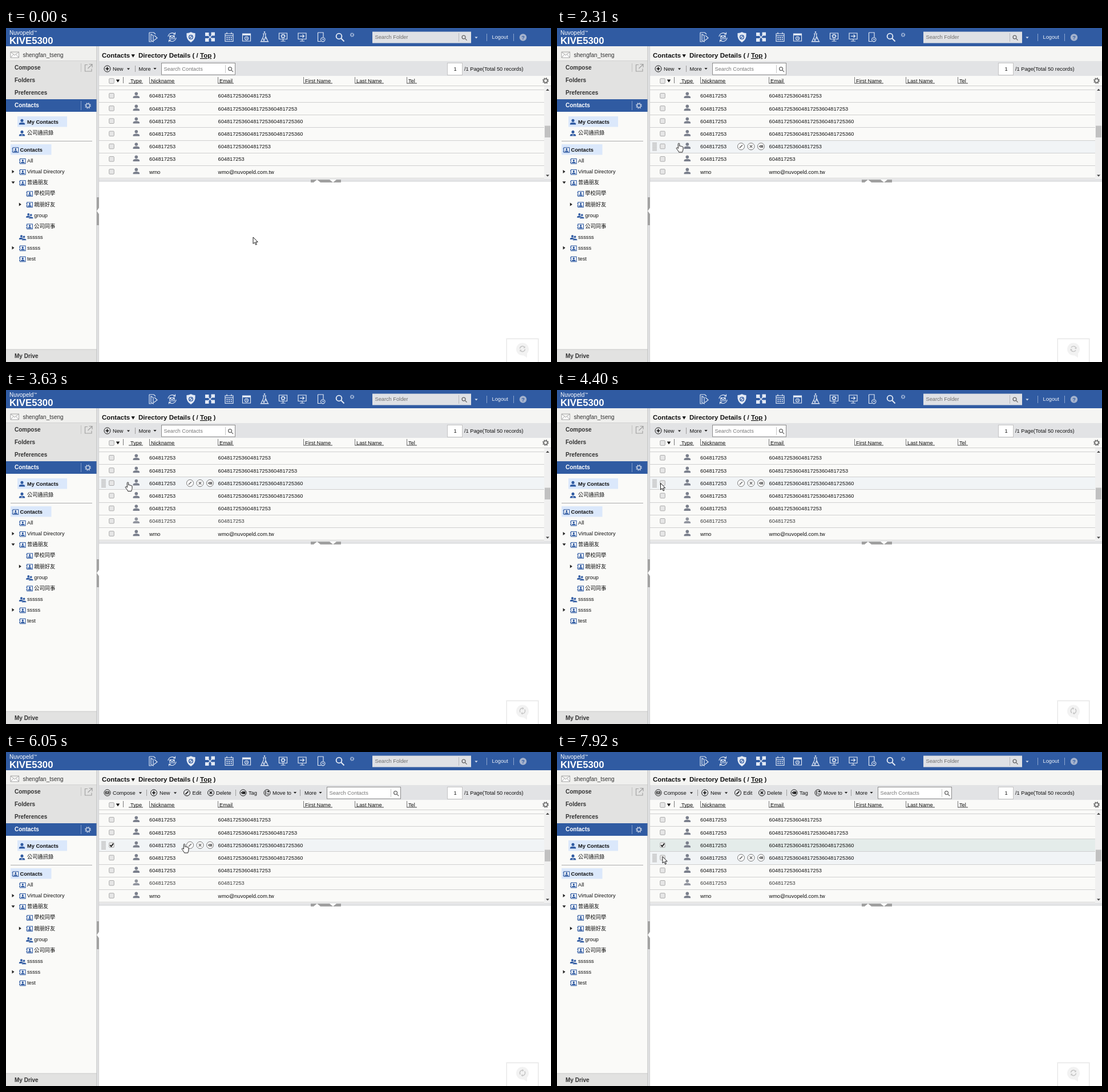
These frames come from a looping animation (955x586 px, 8000 ms). An HTML page:

```html
<!DOCTYPE html>
<html lang="en">
<head>
<meta charset="utf-8">
<title>Contacts</title>
<style>
html, body { margin: 0; width: 100%; height: 100%; overflow: hidden; background: #fff; }
svg { display: block; width: 955px; height: 586px; cursor: default; }
text { font-family: "Liberation Sans", Arial, "Noto Sans CJK TC", "Noto Sans CJK", sans-serif; font-size: 9.24px; fill: #111; white-space: pre; }
.nav { font-size: 10px; font-weight: bold; fill: #333; }
.title { font-size: 11.5px; font-weight: bold; }
.b { font-weight: bold; }
</style>
</head>
<body>
<svg id="stage" viewBox="0 0 955 586" xmlns="http://www.w3.org/2000/svg"></svg>
<script>
const BLUE = '#305ba2', INK = '#111', LINE = '#cfcfcf';
const STEP = 110, LOOP = 8000;

// drawing helpers
const text = (x, y, s, more = '') => `<text x="${x}" y="${y}" ${more}>${s}</text>`;
const rect = (x, y, w, h, fill, more = '') => `<rect x="${x}" y="${y}" width="${w}" height="${h}" fill="${fill}" ${more}/>`;
const path = (d, fill = 'none', more = '') => `<path d="${d}" fill="${fill}" ${more}/>`;
const circle = (x, y, r, fill = 'none', more = '') => `<circle cx="${x}" cy="${y}" r="${r}" fill="${fill}" ${more}/>`;
const group = (body, more = '') => `<g ${more}>${body}</g>`;
const at = (x, y, body, more = '', scale = 1) => group(body, `transform="translate(${x} ${y}) scale(${scale})" ${more}`);
const stroke = (color, w = 1) => `stroke="${color}" stroke-width="${w}"`;
const caret = (x, y, fill = '#222', s = 2.6, h = s * 1.15) => path(`M${x - s} ${y - h / 2}h${2 * s}l${-s} ${h}z`, fill);
const caretRight = (x, y) => path(`M${x - 2} ${y - 3}v6l4 -3z`, '#222');
const divider = (x, y, h, color) => rect(x, y, 1, h, color);
const lens = (x, y, s, color, w = 1.3) =>
  at(x, y, circle(-s * .2, -s * .2, s * .65) + path(`M${s * .3} ${s * .3}L${s} ${s}`), `fill="none" ${stroke(color, w)}`);
const gear = (x, y, r, color) =>
  circle(x, y, r * .6, 'none', stroke(color, r * .3)) +
  circle(x, y, r * .85, 'none', stroke(color, r * .3) + ` stroke-dasharray="${r * .334}"`);
const person = (x, y, color, scale = 1) =>
  at(x, y, circle(0, -2.9, 2.8, color) + path('M-5.7 5V3.4C-5.7 1.6 -3 .7 0 .7S5.7 1.6 5.7 3.4V5z', color), '', scale);
const checkbox = (x, y) => rect(x, y, 8.6, 8.6, '#e6e6e6', `rx="1.2" ${stroke('#acacac')}`);

// glyphs placed inside the small round buttons
const GLYPH = {
  plus: '<path d="M-3 0H3M0 -3V3" stroke-width="1.7"/>',
  mail: '<path d="M-3 -1.8H3V2H-3ZM-3 -1.5L0 .7L3 -1.5"/>',
  edit: '<path d="M-2.6 2.6L2.4 -2.4" stroke-width="1.7"/>',
  cross: '<path d="M-2.3 -2.3L2.3 2.3M2.3 -2.3L-2.3 2.3" stroke-width="1.4"/>',
  tag: '<path d="M-2.9 0L-1 -1.5H3V1.5H-1Z" stroke-width="1.5"/><path d="M-.6 0H3" stroke-width="1.8"/>',
  move: '<path d="M-2.4 -3.2V3.2M.2 -2.2H3M1.5 -3.6L3 -2.2L1.5 -.8M.2 2.2H3" stroke-width="1.2"/>'
};
const round = (x, y, glyph, color = INK, fill = 'none', r = 5.5) =>
  at(x, y, circle(0, 0, r, fill) + GLYPH[glyph], `class="round" fill="none" ${stroke(color)}`);

function topBar() {
  const W = '#e3eaf5';
  const line = (x, body) => at(x, 16, body, `fill="none" ${stroke(W, 1.15)}`);
  const brand = rect(0, 0, 955, 32, BLUE) +
    text(6, 12, 'Nuvopeld<tspan font-size="6" dy="-3">™</tspan>', 'style="font-size:10px;fill:#fff"') +
    text(6, 27.6, 'KIVE5300', 'class="b" style="font-size:16.8px;fill:#fff"');
  const screen = path('M-7 -7H7V3.5H-7ZM0 3.5V6.5M-4 7H4');
  const square = ([x, y]) => rect(x, y, 6.5, 6, W, 'stroke="none"');
  const icons =
    line(258, path('M-7 -8H1L4 -5M-7 -8V8H-3M-4 -5L0 -3V8L-4 6ZM2 -3L7 1.5L1 6')) +
    line(291, path('M-7 -1A7.3 7.3 0 0 1 5 -5.5M7 1A7.3 7.3 0 0 1 -5 5.7M5.5 -8.5V-5H2M-5.5 8.5V5.2H-2') + path('M-4 -2.5H4V3H-4ZM-4 -2L0 1L4 -2')) +
    line(324, path('M-7 -6.5Q-3 -6.5 0 -8.3Q3 -6.5 7 -6.5Q8 4 0 8.5Q-8 4 -7 -6.5Z', W) +
      group(circle(0, 0, 3.4) + path('M-2.4 2.4L2.4 -2.4'), stroke(BLUE, 1.3))) +
    line(357.5, [[-8.5, -8], [2, -8.5], [-8.5, 2], [2, 1.5]].map(square).join('') + path('M-5 -5L5 5M5 -5L-5 5')) +
    line(391, path('M-7 -6H7V7.5H-7ZM-7 -2.5H7M-4 -8.5V-5M4 -8.5V-5') + path('M-4.5 .8H5M-4.5 4.2H5', 'none', 'stroke-dasharray="2 1.6" stroke-width="2"')) +
    line(421.5, path('M-7 -6H7V7H-7Z') + path('M-7 -4.5H7', 'none', 'stroke-width="3"') + circle(0, 2, 3) + path('M0 .5V2H1.6')) +
    line(453, path('M-1.7 -6V-2L-6 7.5H6L1.7 -2V-6M-3 -6H3M-3.6 3H3.6M-7.5 8H7.5') + circle(-1, 5.2, .8) + circle(1.6, .8, .7) + circle(0, -8.8, .7)) +
    line(485.5, screen) + gear(485.5, 14.3, 4.2, W) +
    line(519, screen + path('M-4 -1.7H3M.5 -4.5L3.5 -1.7L.5 1')) +
    line(552, path('M-5.5 -8H4V0M-5.5 -8V7.5H0') + circle(3.3, 4.3, 3.6) + path('M3.3 2.5V4.5H5')) +
    lens(585, 16, 7.5, W, 1.9) + gear(606.5, 12, 3.8, '#a9bcdc');
  const search = rect(642, 6.5, 173, 20, '#dfe1e5') + text(646.5, 19.4, 'Search Folder', 'style="fill:#6f6f6f"') +
    divider(793, 9, 15, '#b5b8bd') + lens(803, 17, 4.6, '#666') + caret(824, 17, '#d6e0f0') +
    divider(842, 10, 13, '#8ea6ce') + text(851.5, 19.4, 'Logout', 'style="fill:#eef2f9"') + divider(889, 10, 13, '#8ea6ce') +
    circle(906, 16.5, 6.2, '#a5b3cd') + text(906, 20, '?', `class="b" text-anchor="middle" style="fill:${BLUE}"`);
  return brand + icons + search;
}

// tree icons, anchored at left edge and vertical centre
const card = (x, y) => at(x, y,
  rect(1.5, -4.2, 9.6, 8.6, '#fff', stroke(BLUE, 1.1)) + rect(0, -2.6, 2, 1.2, BLUE) + rect(0, 1.6, 2, 1.2, BLUE) +
  circle(6.3, -1.2, 1.7, BLUE) + path('M3 3.4Q3 .8 6.3 .8T9.6 3.4Z', BLUE));
const people = (x, y) => person(x + 4, y, BLUE, .72) +
  at(x + 8.5, y + 1.5, circle(0, -2.4, 2.2, BLUE) + path('M-4 4V2.4Q-3.6 .4 0 .4T4 2.4V4z', BLUE), stroke('#fafaf8', .7));

function sidebar() {
  let s = rect(0, 32, 159, 554, '#fafaf8') + rect(0, 32, 159, 26, '#f0f0ee') + rect(0, 58, 159, 67, '#e2e2e1') + rect(0, 57, 159, 1, '#d2d2d2');
  s += at(8, 42, path('M0 0H14.5V10H0ZM0 0L7.2 6L14.5 0M0 10L5 4.4M14.5 10L9.5 4.4', '#fff', stroke('#9a9a9a', .9)));
  s += text(29.5, 50.5, 'shengfan_tseng', 'style="font-size:10px;fill:#333"');
  s += rect(0, 125, 159, 22, BLUE) + rect(0, 564, 159, 22, '#e2e2e1') + rect(0, 563.5, 159, 1, '#cacaca');
  [['Compose', 69], ['Folders', 91], ['Preferences', 113.5], ['My Drive', 575.5]].forEach(([t, y]) => s += text(15, y + 3.7, t, 'class="nav"'));
  s += text(15, 139.4, 'Contacts', 'class="nav" style="fill:#fff"');
  s += divider(131, 62, 15, '#c2c2c2') + path('M143 64.5H138.5V76H150V71.5M145.5 63.5H151V69M151 63.5L143.5 71', 'none', stroke('#a2a2a2', 1.2));
  s += divider(131, 128, 16, '#7f9bc9') + gear(143.5, 136.3, 5.4, '#b7c5de');
  s += rect(20, 155, 87, 18.5, '#dbe8fb') + person(28, 165, BLUE, .9) + text(37, 167.7, 'My Contacts', 'class="b"');
  s += person(28, 185, BLUE, .9) + path('M28 186.3V189.3', 'none', stroke('#fff', .9)) + text(37, 187, '公司通訊錄');
  s += rect(8, 198, 143, 1, '#ababab') + rect(8, 204, 71.5, 18.5, '#dbe8fb') + card(10.5, 214) + text(24.5, 216.7, 'Contacts', 'class="b"');
  const tree = [
    ['All', 0], ['Virtual Directory', 0, 'r'], ['普通朋友', 0, 'd'], ['學校同學', 1], ['親朋好友', 1, 'r'],
    ['group', 1, '', 1], ['公司同事', 1], ['ssssss', 0, '', 1], ['sssss', 0, 'r'], ['test', 0]
  ];
  tree.forEach(([name, depth, arrow, many], i) => {
    const x = 23 + depth * 12.3, y = 233 + i * 19.1;
    s += (many ? people : card)(x, y + .6) + text(x + 14, y + 3.1, name);
    if (arrow === 'r') s += caretRight(x - 10.5, y);
    if (arrow === 'd') s += caret(x - 10.5, y, '#222', 3, 4);
  });
  s += rect(159, 32, 4, 554, '#e3e4e6') + rect(158.5, 32, 1, 554, '#bdbdbd') + rect(162, 32, 1, 554, '#cccccc');
  s += rect(159, 297, 4, 49, '#a2a2a2') + path('M163 315.5V326.5L159 321Z', '#fff');
  return s;
}

const searchBox = x => rect(x + .5, 61.5, 129, 20.5, '#fff', stroke('#8b8b8b')) + text(x + 4.5, 75, 'Search Contacts', 'style="fill:#777"') +
  divider(x + 112, 65, 14, '#c4c4c4') + lens(x + 121.5, 72.5, 4.6, '#666');
const label = (x, s) => text(x, 74.6, s);
const bar = x => divider(x, 66, 11, '#9b9b9b');
const idleTools = () => round(177.5, 71.5, 'plus') + label(187, 'New') + caret(214.5, 72) + bar(226) +
  label(232.5, 'More') + caret(261, 71.5) + searchBox(272);
const selectTools = () => round(177.5, 71.5, 'mail') + label(187, 'Compose') + caret(235.5, 72) + bar(246) +
  round(259, 71.5, 'plus') + label(269, 'New') + caret(296.5, 72) +
  round(317, 71.5, 'edit') + label(326.5, 'Edit') + round(359, 71.5, 'cross') + label(368, 'Delete') + bar(402) +
  round(415.5, 71.5, 'tag') + label(425, 'Tag') + round(457.5, 71.5, 'move') + label(467, 'Move to') + caret(506.5, 71.5) + bar(515) +
  label(523, 'More') + caret(551, 71.5) + searchBox(562);

function mainFrame() {
  let s = rect(163, 32, 792, 26, '#f5f5f3') + rect(163, 58, 792, 26, '#e2e3e5') + rect(163, 84, 792, 181, '#fafaf8');
  s += text(168, 52, 'Contacts', 'class="title"') + caret(222.7, 49, INK, 3.2, 5.6) +
    text(232, 52, 'Directory Details ( / <tspan text-decoration="underline">Top</tspan> )', 'class="title"');
  s += rect(773.5, 61.5, 26, 21, '#fff', stroke('#c4c4c4')) + text(787, 75.3, '1', 'text-anchor="middle"') + text(803, 75, '/1 Page(Total 50 records)');
  s += rect(163, 101, 792, 1, LINE) + checkbox(180.7, 88.7) + caret(196, 93, INK, 3.2, 5);
  s += divider(205, 86, 11, '#777');
  [['Type', 215, 25], ['Nickname', 251, 45], ['Email', 371, 28], ['First Name', 521, 51], ['Last Name', 611, 51], ['Tel', 702, 18]].forEach(([t, x, w], i) => {
    s += text(x + 3, 95.7, t) + rect(x, 96.5, w, 1, '#444') + (i ? divider(x, 86, 11, '#777') : '');
  });
  s += gear(945.5, 92.5, 5.5, '#6b6b6b');
  s += rect(943, 102, 12, 163, '#f0f0f0') + rect(944, 171.5, 10, 20.5, '#c1c1c1') + path('M946 110h6l-3 -3.3z', '#444') + path('M946 257.5h6l-3 3.3z', '#444');
  s += rect(163, 265, 792, 5, '#e2e3e5') + rect(163, 270, 792, 316, '#fff');
  s += rect(534, 266, 53, 5, '#a0a0a0') + path('M539 271h12l-6 -5z', '#fff') + path('M567 266h12l-6 5z', '#fff');
  s += rect(876, 544, 58, 44, '#000', 'opacity=".04"') + rect(877.5, 545.5, 55, 42, '#fff', stroke('#e6e6e6'));
  s += circle(905, 563.5, 11, '#f2f2f2') + path('M906 574L913 571V578.5Z', '#f2f2f2');
  s += at(905, 563, group(path('M-4.6 -.7A4.7 4.7 0 0 1 3.6 -3M4.6 .7A4.7 4.7 0 0 1 -3.6 3') + path('M4.6 -4.8V-1.4H1.3ZM-4.6 4.8V1.4H-1.3Z', '#c4c4c4', 'stroke="none"'), `id="spin" fill="none" ${stroke('#c4c4c4', 1.4)}`));
  return s;
}

// contact rows
const DIGITS = '604817253', ROW = 22.2, FIRST = 108.2;
const longId = n => DIGITS.repeat(4).slice(0, n);
const contacts = [18, 27, 29, 29, 18, 9].map(n => [DIGITS, longId(n)]).concat([['wmo', 'wmo@nuvopeld.com.tw']]);
const rowTop = i => Math.floor(FIRST + ROW * i);
const rowMid = i => FIRST + 10.8 + ROW * i;
const ACTIONS = [['edit', 322.5], ['cross', 340], ['tag', 357.5]];

function contactRow([name, mail], i) {
  const y = rowMid(i), base = y + 3.4;
  let grip = '';
  for (let k = 0; k < 7; k++) grip += rect(167, y - 6.7 + k * 2.2, 8, 1.1, '#b3b3b3');
  const buttons = ACTIONS.map(([g, x]) => round(x, y, g, '#727272', '#fff', 6)).join('');
  return group(
    rect(163, rowTop(i) + 1, 780, 22, '#fafaf8', 'class="bg"') + rect(163, rowTop(i), 780, 1, LINE) +
    checkbox(180.7, y - 4.5) + path(`M182.3 ${y}L184.3 ${y + 2.3}L188.2 ${y - 3}`, 'none', 'class="tick" stroke="#111" stroke-width="1.7"') +
    group(person(228.3, y - .9, '#7a7f8c'), 'class="who"') +
    group(text(251, base, name) + text(371.5, base, mail), 'class="words"') +
    group(grip + buttons, 'class="hover"'));
}

const ARROW = 'M0 0V11.5L2.7 9L4.6 13.4L6.4 12.6L4.6 8.4H8.2Z';
const HAND = 'M-1.2 .8C-1.2 -.4 1.2 -.4 1.2 .8V5C1.5 4.2 3.3 4.3 3.4 5.3C3.8 4.7 5.3 4.9 5.5 6C6.2 5.4 7.5 5.8 7.5 7V10.5C7.5 12 6.5 13 6.3 15.5H0C-.5 13.5 -2.5 11.5 -4.2 9C-4.8 7.8 -3 7 -2 8L-1.2 9Z';

const stage = document.getElementById('stage');
stage.innerHTML = topBar() + mainFrame() + sidebar() +
  group(idleTools(), 'id="idle"') + group(selectTools(), 'id="select"') +
  group(contacts.map(contactRow).join('') + rect(163, rowTop(7), 780, 1, LINE), 'id="rows"') +
  group(rect(-12, 18.5, 27, 16, '#000', 'rx="1" opacity=".22"') + rect(-13, 17.5, 26.5, 15.5, '#fff', `rx="1" ${stroke('#777')}`) +
    text(0, 28.7, 'Edit', 'text-anchor="middle" style="fill:#444"'), 'id="tip"') +
  path(ARROW, '#fff', `id="cursor" ${stroke('#111', .95)} stroke-linejoin="round"`);

const byId = id => document.getElementById(id);
const show = (el, on) => { el.style.display = on ? '' : 'none'; };
const idle = byId('idle'), select = byId('select'), tip = byId('tip'), cursor = byId('cursor'), spin = byId('spin');
const rows = [...byId('rows').querySelectorAll(':scope > g')].map(g => {
  const get = c => g.querySelector('.' + c);
  return { bg: get('bg'), tick: get('tick'), who: get('who'), words: get('words'), hover: get('hover'), buttons: [...g.querySelectorAll('.hover .round')] };
});

// [time, values...]
const moves = [
  [0, 433, 367], [110, 433, 367], [880, 213.5, 223], [1870, 213.5, 223], [2420, 213.5, 200], [2640, 213.5, 200],
  [2860, 213.5, 182], [3080, 213.5, 182], [3520, 213.5, 162], [3630, 213.5, 162], [4290, 181.5, 163.5], [5390, 181.5, 163.5],
  [6050, 312.5, 161.5], [6600, 312.5, 161.5], [6930, 340.3, 162], [7150, 340.3, 162], [7810, 185, 183.5], [LOOP, 185, 183.5]
];
const turns = [[0, 0], [1100, 270], [2970, 720], [4400, 1020], [6050, 1395], [6930, 1560], [7920, 1800], [LOOP, 1820]];
const smooth = u => u * u * (3 - 2 * u);
function sample(keys, t, ease = u => u) {
  const k = Math.max(1, keys.findIndex(key => key[0] > t));
  const [a, b] = [keys[k - 1], keys[k]];
  const u = ease((t - a[0]) / (b[0] - a[0]));
  return a.slice(1).map((v, i) => v + (b[i + 1] - v) * u);
}

const CHECKED_ROW = 2, VISITED_ROW = 5;
const VISITED_AT = 2640, CHECK_AT = 4620, TIP_FROM = 6490, TIP_TO = 7150;

function draw(now) {
  const t = Math.floor((now % LOOP) / STEP) * STEP;
  const [x, y] = sample(moves, t, smooth);
  const over = y < 263 ? Math.floor((y - FIRST) / ROW) : -1;
  const checked = t >= CHECK_AT;

  rows.forEach((row, i) => {
    const hot = i === over, on = checked && i === CHECKED_ROW;
    row.bg.setAttribute('fill', hot ? '#f1f4f6' : on ? '#e4ecea' : '#fafaf8');
    show(row.tick, on);
    show(row.hover, hot);
    row.buttons.forEach((b, k) => b.setAttribute('stroke', hot && Math.abs(x - ACTIONS[k][1]) < 6.5 ? INK : '#727272'));
    const faded = i === VISITED_ROW && t >= VISITED_AT;
    row.who.style.opacity = row.words.style.opacity = faded ? .82 : 1;
  });

  show(idle, !checked);
  show(select, checked);
  show(tip, t >= TIP_FROM && t < TIP_TO);
  tip.setAttribute('transform', `translate(${x} ${y})`);
  cursor.setAttribute('d', over >= 0 && x > 192 ? HAND : ARROW);
  cursor.setAttribute('transform', `translate(${x} ${y})`);
  spin.setAttribute('transform', `rotate(${sample(turns, t)[0]})`);
}

function tick() {
  draw(performance.now());
  requestAnimationFrame(tick);
}
tick();
</script>
</body>
</html>
```
